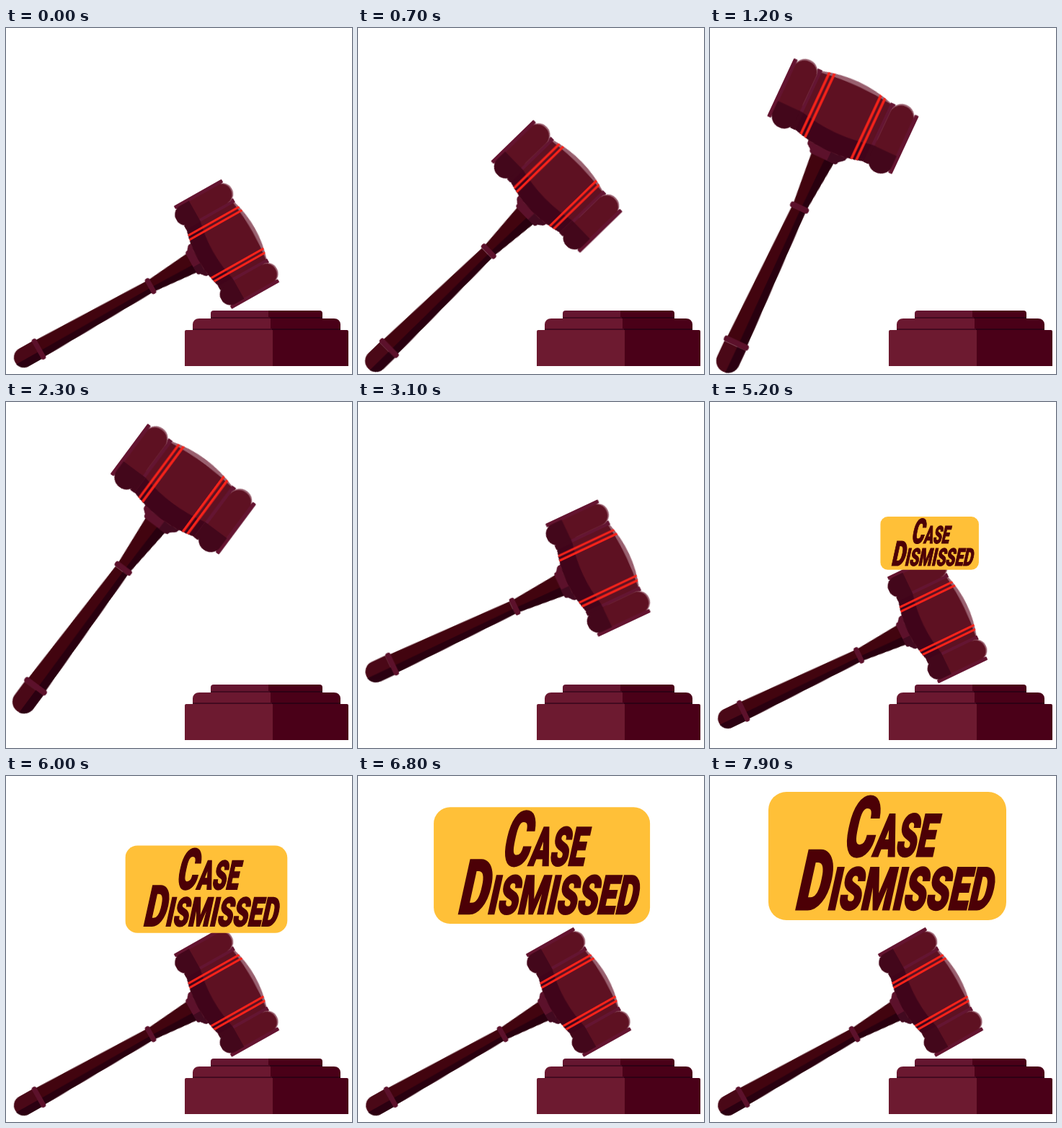
An HTML page that plays this animation: 480 px wide and 480 px high, repeating every 8000 ms.

```html
<!DOCTYPE html>
<html lang="en">
<head>
<meta charset="utf-8">
<title>Case Dismissed</title>
<style>
  html, body { margin: 0; width: 100%; height: 100%; overflow: hidden; background: #fff; }
  svg { display: block; width: 100vw; height: 100vh; }

  .gavel { animation: swing 8s linear infinite; }
  .sign { animation: rise 8s linear infinite; }
  .sparks { animation: flash 8s linear infinite; transform-origin: 325px 385px; }

  .sign text {
    font: 900 115px Roboto, Inter, sans-serif;
    text-anchor: middle;
    fill: #4c0006;
    stroke: #4c0006;
    stroke-width: 3px;
  }
  .sign tspan { font-size: 81px; }

  /* The butt of the handle is the pivot. */
  @keyframes swing {
    0% { transform: translate(25px, 457px) rotate(-29.4deg) scale(1); animation-timing-function: cubic-bezier(.4, 0, .8, .75); }
    11.25% { transform: translate(25px, 464px) rotate(-51deg) scale(1.12); }
    15% { transform: translate(25px, 462px) rotate(-65deg) scale(1.165); animation-timing-function: ease-out; }
    18.125% { transform: translate(25px, 449px) rotate(-68deg) scale(1.17); }
    22.5% { transform: translate(25px, 424px) rotate(-63deg) scale(1.165); }
    28.75% { transform: translate(25px, 416px) rotate(-53.4deg) scale(1.145); }
    33.75% { transform: translate(25px, 400px) rotate(-39deg) scale(1.1); }
    45% { transform: translate(25px, 342px) rotate(-8deg) scale(1); }
    47.5%, 50% { transform: translate(25px, 332px) rotate(-4deg) scale(1); animation-timing-function: cubic-bezier(.333, 0, .667, 1); }
    69.75%, 100% { transform: translate(25px, 457px) rotate(-29.4deg) scale(1); }
  }

  @keyframes rise {
    0%, 50% { transform: translate(346px, 256px) scale(0); animation-timing-function: cubic-bezier(.3, .335, .8, 1); }
    92.5%, 100% { transform: translate(246px, 111px) scale(1); }
  }

  @keyframes flash {
    0%, 46.25% { transform: scale(0); }
    49.5%, 51% { transform: scale(1); }
    55%, 100% { transform: scale(0); }
  }
</style>
</head>
<body>
<svg viewBox="0 0 480 480">
  <defs>
    <path id="barrel" d="M-38-46Q-52 0-38 46H38Q52 0 38-46Z"/>
    <clipPath id="inBarrel"><use href="#barrel"/></clipPath>
    <clipPath id="shade"><path d="M-60-90H-16V-46Q-27 0-16 46V90H-60Z"/></clipPath>

    <g id="cap">
      <rect x="-39" y="-51" width="78" height="6" fill="#641532"/>
      <rect x="-20" y="-78" width="64" height="29" rx="14" fill="#99606f"/>
      <rect x="-44" y="-78" width="86" height="29" rx="14" fill="#5e1122"/>
      <rect x="-38" y="-82" width="76" height="5" rx="1" fill="#641430"/>
    </g>
    <g id="capShade" fill="#43071b" clip-path="url(#shade)">
      <rect x="-39" y="-51" width="78" height="6"/>
      <rect x="-44" y="-78" width="86" height="29" rx="14"/>
    </g>
    <path id="bands" d="M-50-36.5H50M-50-30.5H50" stroke="#f7231a" stroke-width="3"/>
  </defs>

  <g class="base">
    <path d="M284 402V396Q284 392 288 392H365V402Z" fill="#651630"/>
    <path d="M364 392H435Q439 392 439 396V402H364Z" fill="#4a0018"/>
    <path d="M259 418V411Q260 403 268 403H369V418Z" fill="#6b1830"/>
    <path d="M367 403H455Q463 403 464 411V418H367Z" fill="#4a0018"/>
    <path d="M248 469V421Q248 419 250 419H371V469Z" fill="#6d1a30"/>
    <path d="M370 419H473Q475 419 475 421V469H370Z" fill="#4a0018"/>
    <path d="M284 402H367M259 418H370" stroke="#430a20" stroke-width="2"/>
    <path d="M366 402H439M369 418H464" stroke="#2e0014" stroke-width="2"/>
  </g>

  <g class="sparks" fill="#ffbf35">
    <path d="M252 338L266 333 273 347 279 348 287 364 272 353 269 357Z"/>
    <path d="M281 332L291 329 294 343 299 344 302 363 290 351 286 354Z"/>
    <path d="M255 366L286 373 260 374Z"/>
    <path d="M412 369L414 368 411 378 409 379Z"/>
  </g>

  <g class="gavel">
    <path d="M0-14H20V14H0A14 14 0 0 1 0-14Z" fill="#4a0817"/>
    <path d="M-14 3H20V14H0A14 14 0 0 1-14 3Z" fill="#2b0011"/>
    <path d="M26-13L198-9V9L26 13Z" fill="#42040f"/>
    <path d="M26 3L198 2V9L26 13Z" fill="#29000f"/>
    <path d="M204-9L270-15V15L204 9Z" fill="#42040f"/>
    <path d="M204 2L270 3V15L204 9Z" fill="#29000f"/>
    <g fill="#5c112b">
      <rect x="20" y="-16" width="7" height="32" rx="3"/>
      <rect x="198" y="-12" width="7" height="24" rx="3"/>
      <path d="M266-14Q266-18 270-18L274-23Q276-25 284-24V26Q276 27 274 24L270 19Q266 19 266 15Z"/>
    </g>
    <path d="M266 6H284V26Q276 27 274 24L270 19Q266 19 266 15Z" fill="#420a20"/>

    <g transform="translate(322 1)">
      <use href="#barrel" fill="#99606f"/>
      <path d="M-38-46Q-52 0-38 46H37Q43 0 36-46Z" fill="#5e1122"/>
      <use href="#barrel" fill="#40041a" clip-path="url(#shade)"/>
      <g clip-path="url(#inBarrel)">
        <use href="#bands"/>
        <use href="#bands" transform="scale(1 -1)"/>
      </g>
      <use href="#cap"/>
      <use href="#capShade"/>
      <g transform="scale(1 -1)">
        <use href="#cap"/>
        <use href="#capShade"/>
      </g>
    </g>
  </g>

  <g class="sign">
    <rect x="-165" y="-89" width="330" height="178" rx="25" fill="#ffc038"/>
    <text transform="matrix(.56 0 -.22 1 0 0)">C<tspan>ASE</tspan></text>
    <text transform="matrix(.615 0 -.22 1 6 74)">D<tspan>ISMISSED</tspan></text>
  </g>
</svg>
</body>
</html>
```
